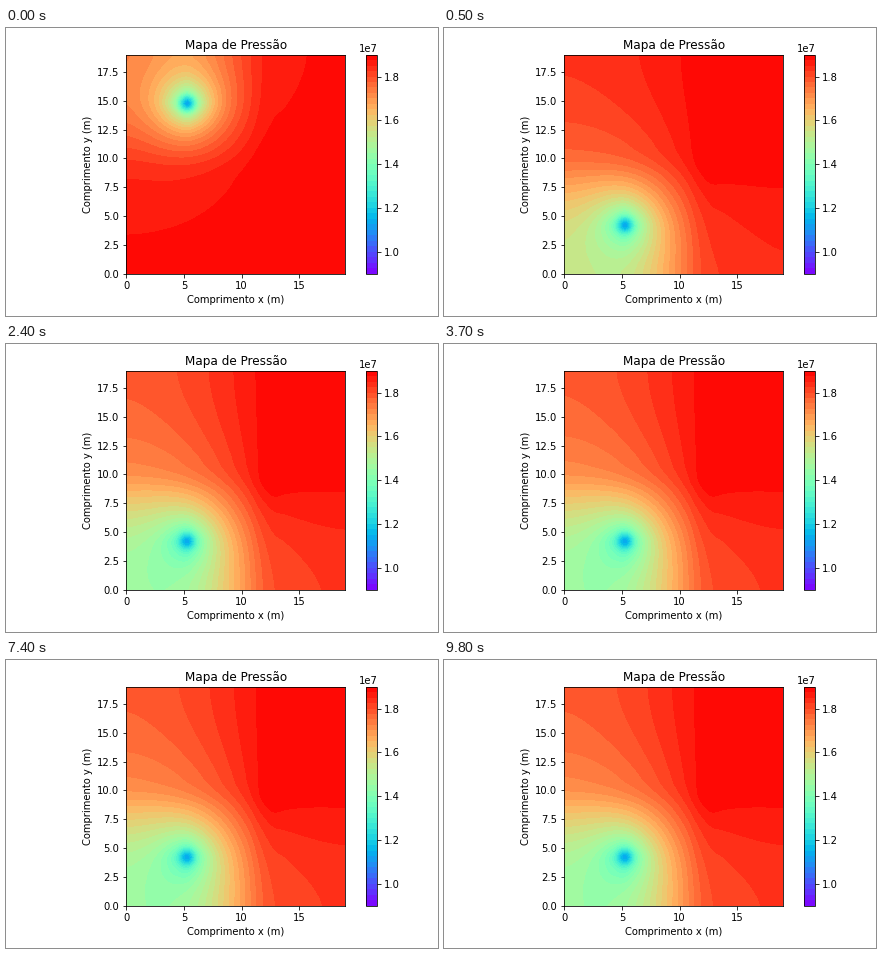
These frames come from a looping animation (432 by 288 pixels, 9.9 s). A matplotlib script:

```python
import numpy as np
import matplotlib.pyplot as plt
from matplotlib.animation import FuncAnimation

W, H, DPI = 432, 288, 72
FRAMES, INTERVAL = 99, 100

# Reservoir model: square, closed boundaries, one producer, one injector
N, SIZE = 19, 19.0
DX = SIZE / (N - 1)
P_INIT, P_PROD, P_INJ = 1.9e7, 1.12e7, 1.9e7
PRODUCER, INJECTOR = (4, 5), (9, 12)      # (row, column)
SPLIT_ROW, SPLIT_COL = 10, 12             # corner where four rocks meet
K_TOP_LEFT, K_BOTTOM_RIGHT, K_TOP_RIGHT = 2.7, 4.5, 100.0
DIFFUSION_STEP = 6.5                      # diffusivity * time step
WARM_UP = 2                               # steps before the first map
LEVELS = np.linspace(9e6, 1.9e7, 41)


def node(row, col):
    return row * N + col


def permeability():
    k = np.ones((N, N))
    k[SPLIT_ROW:, :SPLIT_COL] = K_TOP_LEFT
    k[:SPLIT_ROW, SPLIT_COL:] = K_BOTTOM_RIGHT
    k[SPLIT_ROW:, SPLIT_COL:] = K_TOP_RIGHT
    k[INJECTOR] = K_TOP_RIGHT
    return k


def step_matrix():
    """Inverse of the implicit time step, wells held at fixed pressure."""
    k = permeability()
    m = np.eye(N * N)
    for r in range(N):
        for c in range(N):
            for r2, c2 in ((r + 1, c), (r, c + 1)):
                if r2 < N and c2 < N:
                    a, b = node(r, c), node(r2, c2)
                    mean = 2 * k[r, c] * k[r2, c2] / (k[r, c] + k[r2, c2])
                    t = DIFFUSION_STEP / DX ** 2 * mean
                    m[a, a] += t
                    m[b, b] += t
                    m[a, b] -= t
                    m[b, a] -= t
    for well in (PRODUCER, INJECTOR):
        w = node(*well)
        m[w] = 0
        m[w, w] = 1
    return np.linalg.inv(m)


def cubic_weights(count):
    """Catmull-Rom weights from the N nodes to a finer line of points."""
    s = np.linspace(0, N - 1, count)
    weights = np.zeros((count, N))
    for row, pos in enumerate(s):
        i = min(int(pos), N - 2)
        t = pos - i
        parts = ((-t + 2 * t**2 - t**3) / 2,
                 (2 - 5 * t**2 + 3 * t**3) / 2,
                 (t + 4 * t**2 - 3 * t**3) / 2,
                 (t**3 - t**2) / 2)
        for offset, part in enumerate(parts):
            weights[row, np.clip(i - 1 + offset, 0, N - 1)] += part
    return weights


def simulate():
    inverse = step_matrix()
    p = np.full(N * N, P_INIT)
    p[node(*PRODUCER)] = P_PROD
    p[node(*INJECTOR)] = P_INJ
    history = []
    for _ in range(WARM_UP + FRAMES):
        p = inverse @ p
        history.append(p.reshape(N, N))
    history = history[WARM_UP:]
    # the opening map is drawn with its rows reversed
    history[0] = history[0][::-1]
    return history


FINE = 6 * (N - 1) + 1
weights = cubic_weights(FINE)
grid = np.linspace(0, SIZE, FINE)
history = simulate()

plt.rcParams["font.family"] = "DejaVu Sans"
fig = plt.figure(figsize=(W / DPI, H / DPI), dpi=DPI, facecolor="white")


def pixel_axes(left, bottom, width, height):
    return fig.add_axes([left / W, bottom / H, width / W, height / H])


ax = pixel_axes(120.4, 42.4, 219, 219)
cax = pixel_axes(360.4, 42.4, 10.95, 219)


def draw_map(i):
    field = weights @ history[i] @ weights.T
    field = np.clip(field, LEVELS[0], LEVELS[-1])
    return ax.contourf(grid, grid, field, levels=LEVELS, cmap="rainbow")


current = [draw_map(0)]
fig.colorbar(current[0], cax=cax, ticks=np.arange(10, 19, 2) * 1e6)
cax.yaxis.set_offset_position("right")

ax.set_xlim(0, SIZE)
ax.set_ylim(0, SIZE)
ax.set_xticks([0, 5, 10, 15])
ax.set_yticks(np.arange(0, 18, 2.5))
ax.set_title("Mapa de Pressão")
ax.set_xlabel("Comprimento x (m)")
ax.set_ylabel("Comprimento y (m)")


def update(i):
    current[0].remove()
    current[0] = draw_map(i)
    return []


anim = FuncAnimation(fig, update, frames=FRAMES, interval=INTERVAL,
                     init_func=lambda: [], repeat=True, repeat_delay=0,
                     blit=False)
plt.show()
```
